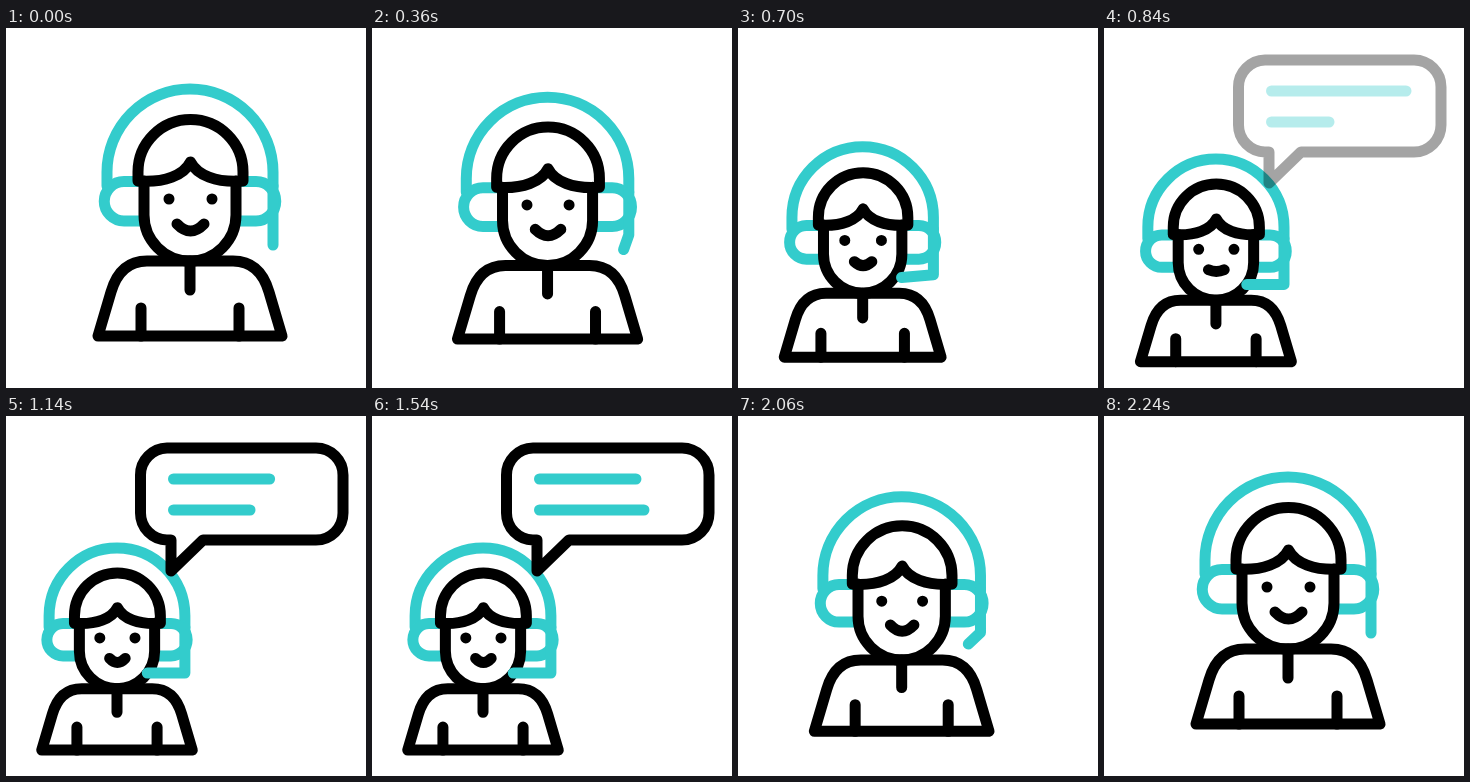
Write an HTML page that moves like this. It is 360 px wide and 360 px high and loops after 2400 ms.

```html
<!DOCTYPE html>
<html>
<head>
<meta charset="utf-8">
<style>
  html, body { margin: 0; width: 100%; height: 100%; overflow: hidden; background: #fff; }
  svg { display: block; width: 100vw; height: 100vh; }
  path { fill: none; stroke: #000; stroke-width: 11; stroke-linecap: round; stroke-linejoin: round; }
  #person path { vector-effect: non-scaling-stroke; }
  path.teal { stroke: #33cccc; }
</style>
</head>
<body>
<svg viewBox="0 0 360 360">
  <g id="person">
    <path class="teal" d="M101 158V144A83 83 0 0 1 267 144V158"/>
    <path class="teal" d="M135 153.5H118a19.7 19.7 0 0 0 0 39.5H137M233 153.5H250a19.7 19.7 0 0 1 0 39.5H231"/>
    <path d="M138 153V187A46 46 0 0 0 230 187V153"/>
    <path d="M132 153V144A52.5 52.5 0 0 1 237 144V153C210 155 191 147 184.5 134C178 147 159 155 132 153Z"/>
    <path d="M163 171h0M206 171h0"/>
    <path id="mouth"/>
    <path d="M92 308L105 264Q114 233 141 233H227Q254 233 263 264L276 308Z"/>
    <path d="M184 233V262M135 280V308M233 280V308"/>
    <path id="mic" class="teal"/>
  </g>
  <g id="bubble">
    <path d="M165 124H161A27 27 0 0 1 134.5 97V59A27 27 0 0 1 161 32H310A27 27 0 0 1 337 59V97A27 27 0 0 1 310 124H197L165 155Z"/>
    <path id="top" class="teal"/>
    <path id="low" class="teal"/>
  </g>
</svg>
<script>
const LOOP = 2400;
const el = id => document.getElementById(id);
const mix = (a, b, k) => a + (b - a) * k;

function ease(t, from, to) {
  const k = Math.min(1, Math.max(0, (t - from) / (to - from)));
  return k * k * (3 - 2 * k);
}

// Rises from 0 to 1 and later falls back
const pulse = (t, a, b, c, d) => ease(t, a, b) - ease(t, c, d);

function draw(t) {
  const p = pulse(t, 220, 885, 1800, 2200);
  el('person').setAttribute('transform',
    `translate(${mix(184, 111, p)} ${mix(308, 334, p)}) scale(${mix(1, 0.818, p)}) translate(-184 -308)`);

  const talk = Math.cos((t - 840) * Math.PI / 250);
  const half = mix(13.5, 9.5, p);
  const depth = mix(14, 7.5 - 3.5 * talk, p);
  el('mouth').setAttribute('d', `M${184.5 - half} 196q${half} ${depth} ${2 * half} 0`);

  el('mic').setAttribute('d',
    `M267 158V${mix(200, 214, p)}L${mix(267, 221, p)} ${mix(217, 214, p)}`);

  el('bubble').setAttribute('opacity', pulse(t, 745, 985, 1678, 1916));
  el('top').setAttribute('d', `M167.5 63H${mix(302, 243, pulse(t, 840, 1340, 1340, 1840))}`);
  el('low').setAttribute('d', `M167.5 94H${mix(225, 272, pulse(t, 840, 1530, 1530, 2220))}`);
}

const start = performance.now();
function tick() {
  draw((performance.now() - start) % LOOP);
  requestAnimationFrame(tick);
}
tick();
</script>
</body>
</html>
```
